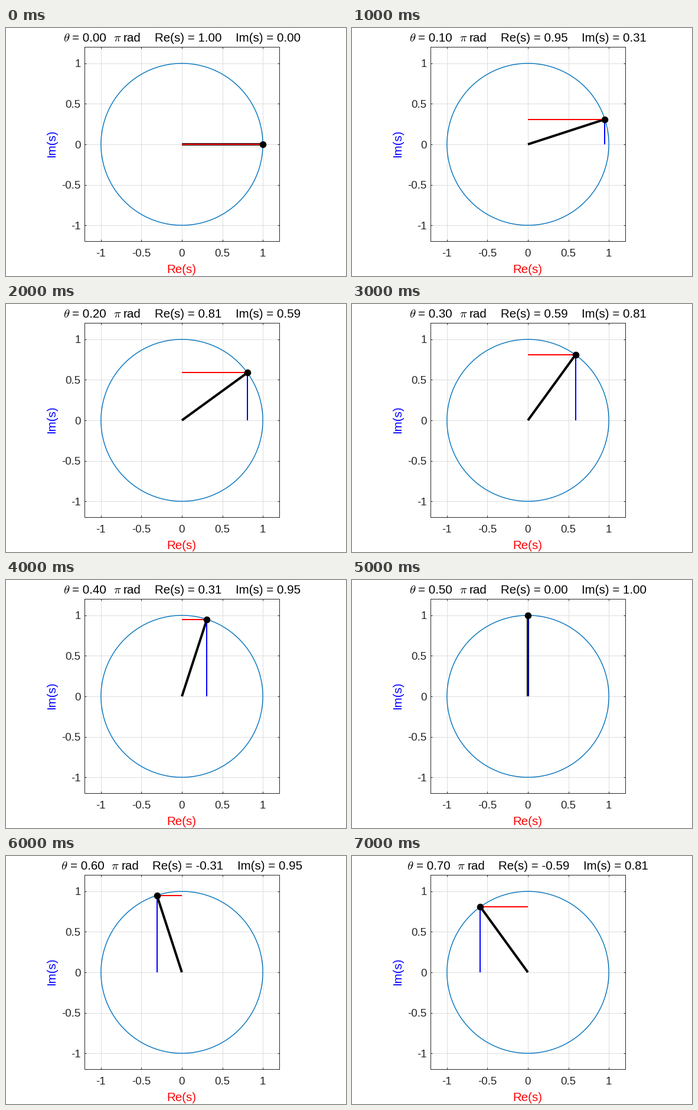
A matplotlib script for the animation above (8 s loop, 576 by 420 pixels).

```python
import numpy as np
import matplotlib.pyplot as plt
from matplotlib.animation import FuncAnimation

W, H, DPI = 576, 420, 96
PT = 72 / DPI                      # points per pixel
CX, CY, UNIT = 298, 197, 137.1
LEFT, RIGHT, TOP, BOTTOM = 133, 463, 32, 361
INK, GRID, RIM = "#262626", "#dedede", "#0072bd"
TICK_PT, LABEL_PT = 14, 15.4
EM = LABEL_PT / PT
TICK = 3
FRAMES, INTERVAL = 8, 1000

plt.rcParams["font.family"] = "Liberation Sans"
plt.rcParams["mathtext.fontset"] = "cm"

fig = plt.figure(figsize=(W / DPI, H / DPI), dpi=DPI, facecolor="white")
ax = fig.add_axes([0, 0, 1, 1])
ax.set_xlim(0, W)
ax.set_ylim(H, 0)
ax.axis("off")


def px(x):
    return CX + UNIT * x


def py(y):
    return CY - UNIT * y


def line(xs, ys, color, width, z):
    return ax.plot(xs, ys, color=color, lw=width * PT, zorder=z,
                   solid_capstyle="butt")[0]


def label(x, y, text, size=LABEL_PT, color="black", ha="left", **kw):
    return ax.text(x, y, text, size=size, color=color, ha=ha,
                   va="baseline", zorder=9, **kw)


# grid, ticks and tick labels
for v in (-1, -0.5, 0, 0.5, 1):
    x, y = px(v), py(v)
    line([x, x], [TOP, BOTTOM], GRID, 1, 1)
    line([LEFT, RIGHT], [y, y], GRID, 1, 1)
    for edge, step in ((TOP, TICK), (BOTTOM, -TICK)):
        line([x, x], [edge, edge + step], INK, 1, 3)
    for edge, step in ((LEFT, TICK), (RIGHT, -TICK)):
        line([edge, edge + step], [y, y], INK, 1, 3)
    label(x - 0.5, 386.6, f"{v:g}", TICK_PT, INK, "center")
    label(126.5, y + 6.6, f"{v:g}", TICK_PT, INK, "right")

line([LEFT, RIGHT, RIGHT, LEFT, LEFT], [TOP, TOP, BOTTOM, BOTTOM, TOP],
     INK, 1, 3)
label(CX - 0.5, 415, "Re(s)", color="red", ha="center")
label(83, CY - 1.5, "Im(s)", color="blue", ha="center",
      rotation=90, rotation_mode="anchor")

# unit circle
t = np.linspace(0, 2 * np.pi, 361)
line(px(np.cos(t)), py(np.sin(t)), RIM, 1.4, 4)

# moving parts
radius = line([], [], "black", 4, 5)
im_line = line([], [], "blue", 2, 6)
re_line = line([], [], "red", 2, 6)
dot, = ax.plot([], [], "o", color="black", ms=11.5 * PT, mew=0, zorder=7)

# title pieces with their offsets in em
OFFSETS = (0, 0.747, 4.13, 4.98, 7.55, 14.22)
title = [label(0, 23, "") for _ in OFFSETS]


def update(i):
    turn = i / 10
    re, im = np.cos(turn * np.pi), np.sin(turn * np.pi)
    x, y = px(re), py(im)
    radius.set_data([CX, x], [CY, y])
    im_line.set_data([x, x], [CY, y])
    re_line.set_data([CX, x], [y, y])
    dot.set_data([x], [y])

    minus = 0.333 if re < 0 else 0
    start = 96.8 - minus * EM / 2
    words = (r"$\theta$", f"= {turn:.2f}", r"$\pi$", "rad",
             f"Re(s) = {re:.2f}", f"Im(s) = {im:.2f}")
    for k, (part, word) in enumerate(zip(title, words)):
        shift = minus if k == len(words) - 1 else 0
        part.set_x(start + (OFFSETS[k] + shift) * EM)
        part.set_text(word)
    return [radius, im_line, re_line, dot, *title]


anim = FuncAnimation(fig, update, frames=FRAMES, interval=INTERVAL,
                     repeat=True, repeat_delay=0)
plt.show()
```
